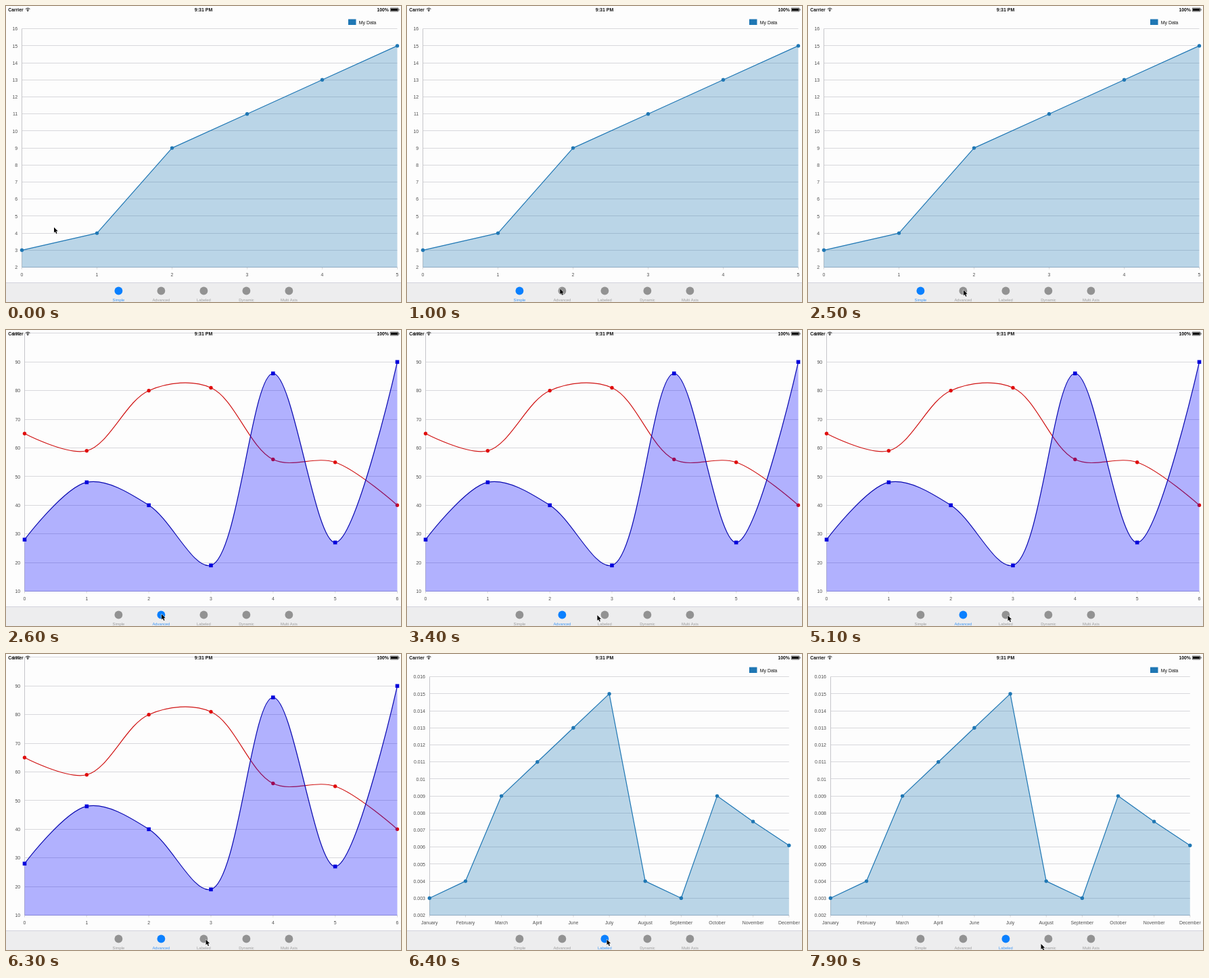
Recreate the animation shown at these times as an HTML page with a canvas. Size 584 px wide and 438 px high, loop 8 s.

```html
<!DOCTYPE html>
<html lang="en">
<head>
<meta charset="utf-8">
<title>Line charts</title>
<style>
html, body { margin: 0; width: 100%; height: 100%; overflow: hidden; background: #fdfdfd; }
canvas { display: block; width: 584px; height: 438px; }
</style>
</head>
<body>
<canvas id="stage" width="584" height="438"></canvas>
<script>
const ctx = document.getElementById('stage').getContext('2d');
const LOOP = 8000, STEP = 100, BOTTOM = 386.5;
const FONT = '"Liberation Sans", Arial, sans-serif';
const PAPER = '#fdfdfd', INK = '#111', LABEL = '#505050';
const TABS = ['Simple', 'Advanced', 'Labeled', 'Dynamic', 'Multi Axis'];
const MONTHS = ['January', 'February', 'March', 'April', 'June', 'July', 'August',
  'September', 'October', 'November', 'December'];

// Cursor moves: start, end, from, to
const MOVES = [
  [0, 1100, [71, 327], [230, 420]],
  [2700, 3700, [230, 420], [295.5, 422]],
  [7200, 7900, [295.5, 422], [344.5, 428.5]]
];

function text(str, x, y, size, color, align = 'left', weight = '') {
  ctx.font = `${weight} ${size}px ${FONT}`;
  ctx.fillStyle = color;
  ctx.textAlign = align;
  ctx.fillText(str, x, y);
}

function line(x1, y1, x2, y2, color) {
  ctx.strokeStyle = color;
  ctx.lineWidth = 1;
  ctx.beginPath();
  ctx.moveTo(x1, y1);
  ctx.lineTo(x2, y2);
  ctx.stroke();
}

function disc(x, y, r, color) {
  ctx.fillStyle = color;
  ctx.beginPath();
  ctx.arc(x, y, r, 0, Math.PI * 2);
  ctx.fill();
}

function axes(c) {
  for (let i = 0; i <= c.rows; i++) {
    const y = BOTTOM - i * c.dy, row = Math.floor(y) + 0.5;
    if (i) line(c.left, row, c.right, row, '#d8d8dc');
    text(c.label(i), c.left - 6.3, y + 2.7, 7, LABEL, 'right');
  }
  const axisX = Math.floor(c.left) + 0.5;
  line(axisX, BOTTOM - c.rows * c.dy, axisX, BOTTOM, '#c6c6ca');
  const step = (c.right - c.left) / (c.names.length - 1);
  c.names.forEach((name, i) => {
    const x = c.left + i * step;
    line(x, BOTTOM, x, BOTTOM + 3, '#d4d4d6');
    text(name, x, 400.4, 6.9, LABEL, 'center');
  });
  line(c.left, BOTTOM, c.right, BOTTOM, '#c0c0c8');
}

function place(c, values) {
  const step = (c.right - c.left) / (values.length - 1);
  return values.map((v, i) => [c.left + i * step, BOTTOM - (v - c.base) / c.unit * c.dy]);
}

function straight(pts) {
  const path = new Path2D();
  pts.forEach(p => path.lineTo(...p));
  return path;
}

// Centripetal Catmull-Rom spline
function spline(pts) {
  const path = new Path2D();
  const gap = (a, b) => Math.sqrt(Math.hypot(b[0] - a[0], b[1] - a[1]));
  const handle = (i, side) => {
    const a = pts[i - 1], p = pts[i], b = pts[i + 1];
    if (!a || !b) return p;
    const g = gap(a, p), h = gap(p, b), reach = (side < 0 ? g : h) * side / 3;
    return [0, 1].map(k =>
      p[k] + reach * ((p[k] - a[k]) / g * h + (b[k] - p[k]) / h * g) / (g + h));
  };
  path.moveTo(...pts[0]);
  for (let i = 1; i < pts.length; i++)
    path.bezierCurveTo(...handle(i - 1, 1), ...handle(i, -1), ...pts[i]);
  return path;
}

function series(c, values, { curve, color, fill, dot, square }) {
  const pts = place(c, values), path = curve(pts);
  if (fill) {
    const area = new Path2D(path);
    area.lineTo(c.right, BOTTOM + 0.5);
    area.lineTo(c.left, BOTTOM + 0.5);
    area.closePath();
    ctx.fillStyle = fill;
    ctx.fill(area);
  }
  ctx.strokeStyle = color;
  ctx.lineWidth = 1.2;
  ctx.lineJoin = 'round';
  ctx.stroke(path);
  for (const [x, y] of pts) {
    if (square) {
      ctx.fillStyle = dot;
      ctx.fillRect(x - 2.8, y - 2.8, 5.6, 5.6);
    } else disc(x, y, 2.7, dot);
  }
}

const STEEL = { curve: straight, color: '#1f77b4', fill: 'rgba(31,119,180,.3)', dot: '#1f77b4' };
const RED = { curve: spline, color: '#d01414', dot: '#e00c0c' };
const BLUE = { curve: spline, color: '#0808b0', fill: 'rgba(0,0,255,.3)', dot: '#0404dc', square: true };
const count = n => Array.from({ length: n }, (_, i) => String(i));

const CHARTS = [
  { left: 23.5, right: 578.5, rows: 14, dy: 25.2, base: 2, unit: 1, legend: true,
    names: count(6), label: i => String(i + 2),
    data: [[[3, 4, 9, 11, 13, 15], STEEL]] },
  { left: 27.5, right: 578.5, rows: 9, dy: 42.4, base: 10, unit: 10,
    names: count(7), label: i => String(10 + i * 10),
    data: [[[65, 59, 80, 81, 56, 55, 40], RED], [[28, 48, 40, 19, 86, 27, 90], BLUE]] },
  { left: 33.3, right: 564.8, rows: 14, dy: 25.2, base: 2, unit: 1, legend: true,
    names: MONTHS, label: i => String((i + 2) / 1000),
    data: [[[3, 4, 9, 11, 13, 15, 4, 3, 9, 7.5, 6.1], STEEL]] }
];

function chart(c) {
  axes(c);
  c.data.forEach(([values, style]) => series(c, values, style));
  if (c.legend) {
    ctx.fillStyle = '#1f77b4';
    ctx.fillRect(506, 19.5, 11.5, 8.5);
    text('My Data', 521.8, 26.8, 6.9, INK);
  }
}

function statusBar() {
  text('Carrier', 3.3, 8.2, 6.8, INK, 'left', 'bold');
  ctx.strokeStyle = INK;
  ctx.lineWidth = 1;
  for (const r of [2.4, 4.4]) {
    ctx.beginPath();
    ctx.arc(32.2, 7.6, r, -Math.PI * 0.76, -Math.PI * 0.24);
    ctx.stroke();
  }
  disc(32.2, 7.2, 0.9, INK);
  text('9:31 PM', 292, 8.2, 7, INK, 'center', 'bold');
  text('100%', 566, 8.2, 6.9, INK, 'right', 'bold');
  ctx.lineWidth = 0.6;
  ctx.strokeRect(568.3, 3, 11.6, 5);
  ctx.fillStyle = INK;
  ctx.fillRect(569, 3.7, 10.2, 3.6);
  ctx.fillRect(580.4, 4.5, 1, 2);
}

function tabBar(active) {
  ctx.fillStyle = '#ededee';
  ctx.fillRect(0, 410, 584, 28);
  line(0, 409.5, 584, 409.5, '#d2d2dc');
  TABS.forEach((name, i) => {
    const x = 166.4 + i * 63, on = i === active;
    disc(x, 421.5, 5.9, on ? '#0a80ff' : '#929292');
    text(name, x, 437, 5.8, on ? '#3a94f4' : '#9c9c9c', 'center');
  });
}

function cursor(t) {
  let pos = MOVES[0][2];
  for (const [start, end, from, to] of MOVES) {
    if (t < start) break;
    const k = Math.min(1, (t - start) / (end - start)), e = k * k * (3 - 2 * k);
    pos = from.map((v, i) => v + (to[i] - v) * e);
  }
  ctx.save();
  ctx.translate(...pos);
  const arrow = new Path2D('M0 .4V8.4L1.8 6.8L3.2 10L4.5 9.4L3.2 6.3H5.7Z');
  ctx.strokeStyle = '#fff';
  ctx.lineWidth = 1;
  ctx.stroke(arrow);
  ctx.fillStyle = '#000';
  ctx.fill(arrow);
  ctx.restore();
}

function draw(now) {
  const t = Math.floor(now % LOOP / STEP) * STEP;
  const active = t < 2600 ? 0 : t < 6400 ? 1 : 2;
  ctx.fillStyle = PAPER;
  ctx.fillRect(0, 0, 584, 438);
  chart(CHARTS[active]);
  statusBar();
  tabBar(active);
  cursor(t);
}

const begin = performance.now();
function tick() {
  draw(performance.now() - begin);
  requestAnimationFrame(tick);
}
tick();
</script>
</body>
</html>
```
